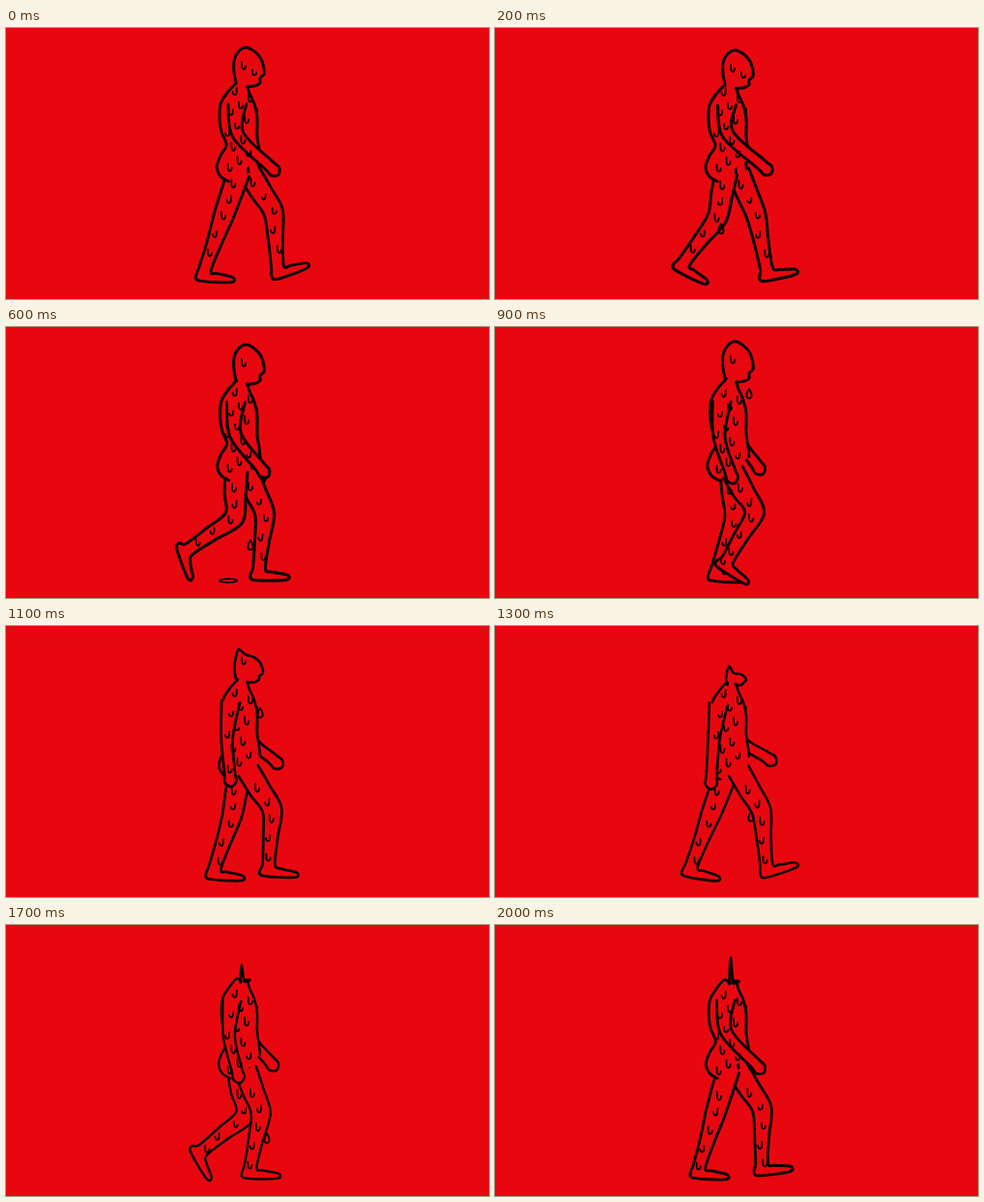
An HTML page with a canvas for the animation above (2100 ms loop, 500 px wide and 281 px high).

```html
<!DOCTYPE html>
<html lang="en">
<head>
<meta charset="utf-8">
<title>Melting walk</title>
<style>
html, body { margin: 0; width: 100%; height: 100%; overflow: hidden; background: #e8070f; }
canvas { display: block; width: 500px; height: 281px; }
</style>
</head>
<body>
<canvas id="stage"></canvas>
<script>
const RED = '#e8070f', INK = '#080203', TAU = Math.PI * 2;
const LOOP = 2100, STEP = 100;
const HIP = [247, 150], THIGH = 48, SHIN = 56;
const canvas = document.getElementById('stage');
const ctx = canvas.getContext('2d');
const dpr = window.devicePixelRatio || 1;
canvas.width = 500 * dpr;
canvas.height = 281 * dpr;
ctx.scale(dpr, dpr);
ctx.lineCap = ctx.lineJoin = 'round';

const clamp = v => Math.max(0, Math.min(1, v));
const frac = v => v - Math.floor(v);
const mix = (a, b, k) => a + (b - a) * k;
const mixPt = (a, b, k) => [mix(a[0], b[0], k), mix(a[1], b[1], k)];
const rand = n => frac(Math.sin(n * 127.1 + 11.7) * 43758.5453);
const wave = v => Math.cos(TAU * v);

// Ankle path over one stride: phase, x, y, foot angle in degrees.
const STRIDE = [
  [0, 281, 247, -20], [0.1, 281, 250, -10], [0.16, 276, 250, 0], [0.24, 262, 250, 0],
  [0.36, 230, 251, 3], [0.5, 206, 250, 3], [0.6, 194, 240, 32], [0.66, 187, 236, 50],
  [0.74, 190, 230, 70], [0.86, 241, 241, 32], [0.94, 272, 247, 3], [1, 281, 247, -20]
];
const FOOT = [[-9, 7], [-7, 12], [10, 13], [29, 12], [29, 7], [13, 4]];

const BACK = [[237, 57], [229, 66], [222, 78], [221, 95], [223, 108], [228, 121], [222, 132], [218, 144], [222, 154], [230, 159]];
const FRONT = [[250, 60], [252, 67], [257, 78], [260, 92], [260, 112], [262, 125], [263, 135]];
const HEAD = [[238, 56], [236, 45], [236, 33], [240, 24], [248, 19], [257, 23], [264, 31], [267, 41], [267, 47], [263, 51], [263, 56], [258, 59], [250, 60]];

// The second stride is quicker and eases out.
function phaseAt(t) {
  if (t < 1500) return t / 2500;
  return 0.6 + 0.4 * (1 - (1 - (t - 1500) / 600) ** 1.4);
}

function trace(p) {
  const at = i => p[Math.max(0, Math.min(p.length - 1, i))];
  ctx.beginPath();
  ctx.moveTo(...p[0]);
  for (let i = 0; i < p.length - 1; i++) {
    const [a, b, c, d] = [at(i - 1), at(i), at(i + 1), at(i + 2)];
    ctx.bezierCurveTo(
      b[0] + (c[0] - a[0]) / 6, b[1] + (c[1] - a[1]) / 6,
      c[0] - (d[0] - b[0]) / 6, c[1] - (d[1] - b[1]) / 6, c[0], c[1]);
  }
}
function shape(p) {
  trace(p);
  ctx.fill();
  ctx.stroke();
}

// Outline around a chain of joints: down the back, round the tip, up the front.
function limb(path, radii, tip) {
  const back = [], front = [];
  path.forEach((p, i) => {
    const a = path[Math.max(0, i - 1)], b = path[Math.min(path.length - 1, i + 1)];
    const dx = b[0] - a[0], dy = b[1] - a[1], r = radii[i] / Math.hypot(dx, dy);
    back.push([p[0] - dy * r, p[1] + dx * r]);
    front.unshift([p[0] + dy * r, p[1] - dx * r]);
  });
  shape([...back, ...tip, ...front]);
}

function legPath(q) {
  const i = STRIDE.findIndex(k => k[0] > q), a = STRIDE[i - 1], b = STRIDE[i];
  const [, x, y, angle] = a.map((v, n) => mix(v, b[n], (q - a[0]) / (b[0] - a[0])));
  const hip = [mix(HIP[0], x, 0.15), HIP[1]];
  const dx = x - hip[0], dy = y - hip[1], d = Math.hypot(dx, dy);
  let along = THIGH * d / (THIGH + SHIN), out = 0;
  if (d < THIGH + SHIN) {
    along = (THIGH ** 2 - SHIN ** 2 + d * d) / (2 * d);
    out = Math.sqrt(Math.max(0, THIGH ** 2 - along ** 2));
  }
  const knee = [hip[0] + (dx * along + dy * out) / d, hip[1] + (dy * along - dx * out) / d];
  const ankle = [x, y];
  return { path: [hip, mixPt(hip, knee, 0.5), knee, mixPt(knee, ankle, 0.5), ankle], angle };
}

function drawLeg({ path, angle }) {
  const [x, y] = path[4], c = Math.cos(angle * TAU / 360), s = Math.sin(angle * TAU / 360);
  const foot = FOOT.map(([u, v]) => [x + u * c - v * s, y + u * s + v * c]);
  limb(path, [11.5, 11, 10, 7.5, 6.5], foot);
}

function drawArm(shoulder, elbow, tip) {
  const d = Math.hypot(tip[0] - elbow[0], tip[1] - elbow[1]);
  const wrist = mixPt(elbow, tip, 1 - 14 / d), hand = mixPt(elbow, tip, 1 - 5 / d);
  limb([shoulder, elbow, wrist, hand], [9.5, 6, 5.5, 6], [tip]);
}

// The head sinks to neck height, then a thread is pulled up from it.
function headLine(t) {
  const melt = clamp((t - 950) / 500), pull = clamp((t - 1500) / 450);
  const spike = 8 * clamp(melt * 4) + 16 * pull;
  return HEAD.map(([x, y], i) => [
    mix(x, 247 + (x - 250) * 0.32, melt ** 2),
    mix(y, 61, melt) - melt * 3 * Math.abs(Math.sin(i * 1.7)) - (i === 3 ? spike : 0)
  ]);
}

function mark(x, y, s, flip) {
  const w = flip ? -2 : 2;
  ctx.beginPath();
  ctx.moveTo(x - w, y - s);
  ctx.lineTo(x - w * 0.9, y + s * 0.3);
  ctx.bezierCurveTo(x - w * 0.7, y + s * 1.1, x + w, y + s * 1.1, x + w * 1.1, y);
  ctx.stroke();
}

function sweatLeg(path, flow, seed) {
  for (let i = 0; i < 5; i++) {
    const f = 0.5 + 3.6 * frac((i + flow) / 5), n = Math.floor(f);
    const [x, y] = mixPt(path[n], path[Math.min(4, n + 1)], f - n);
    mark(x + (rand(seed + i) - 0.5) * 7, y, 2.5 + 2 * rand(seed + i + 9), i % 2);
  }
}

function sweatBody(flow) {
  for (let i = 0; i < 12; i++) {
    const y = 66 + 86 * frac((i + flow) / 12);
    mark(229 + 26 * frac(i * 0.618 + 0.3), y, 2.5 + 2 * rand(i), i % 3 === 0);
  }
}

function drop(x, y) {
  ctx.beginPath();
  ctx.moveTo(x, y - 5);
  ctx.bezierCurveTo(x - 4, y + 1, x - 3, y + 5, x, y + 5);
  ctx.bezierCurveTo(x + 3, y + 5, x + 4, y + 1, x, y - 5);
  ctx.stroke();
}

// Falling drops: x, start height, start time, end time, fall distance.
const DROPS = [
  [234, 203, 100, 400, 46], [253, 192, 300, 600, 34], [263, 69, 900, 1100, 21],
  [265, 190, 1200, 1500, 66], [270, 140, 1400, 1700, 81]
];

function draw(t) {
  const w = phaseAt(t), flow = t / LOOP;
  const swing = 0.5 + 0.5 * wave(w - 0.08), rear = 1 - swing;
  const bob = 4 * wave(2 * (w - 0.1));
  const sway = ([x, y]) => [x, y + bob * Math.max(0, (150 - y) / 130)];
  const far = legPath(w), near = legPath(frac(w + 0.5));

  ctx.fillStyle = RED;
  ctx.strokeStyle = INK;
  ctx.fillRect(0, 0, 500, 281);
  ctx.lineWidth = 2.75 + 0.35 * wave(w - 0.18);

  drawArm([250, 85], [253, 117], [256 + 36 * rear, 168 - 26 * rear]);
  drawLeg(far);
  drawLeg(near);
  const back = BACK.map(([x, y]) => sway([x + 3 * rear, y]));
  shape([...back.reverse(), ...headLine(t).map(sway), ...FRONT.map(sway)]);
  drawArm(
    sway(mixPt([231, 80], [240, 78], swing)),
    mixPt([226, 118], [241, 110], swing),
    mixPt([221, 170], [286, 151], swing));

  ctx.lineWidth = 1.8;
  sweatBody(flow);
  sweatLeg(far.path, flow, 20);
  sweatLeg(near.path, flow, 40);
  if (t < 1200) {
    mark(246, 38 + bob, 4, false);
    if (t < 600) mark(257, 45 + bob, 3, false);
  }
  for (const [x, y, from, to, fall] of DROPS)
    if (t >= from && t <= to) drop(x, y + fall * ((t - from) / (to - from)) ** 2);
  if (t >= 500 && t <= 700) {
    ctx.beginPath();
    ctx.ellipse(230, 263, t === 500 ? 5 : 9, 1.8, 0, 0, TAU);
    ctx.stroke();
  }
}

const start = performance.now();
function frame() {
  const t = (performance.now() - start) % LOOP;
  draw(Math.floor(t / STEP) * STEP);
  requestAnimationFrame(frame);
}
frame();
</script>
</body>
</html>
```
